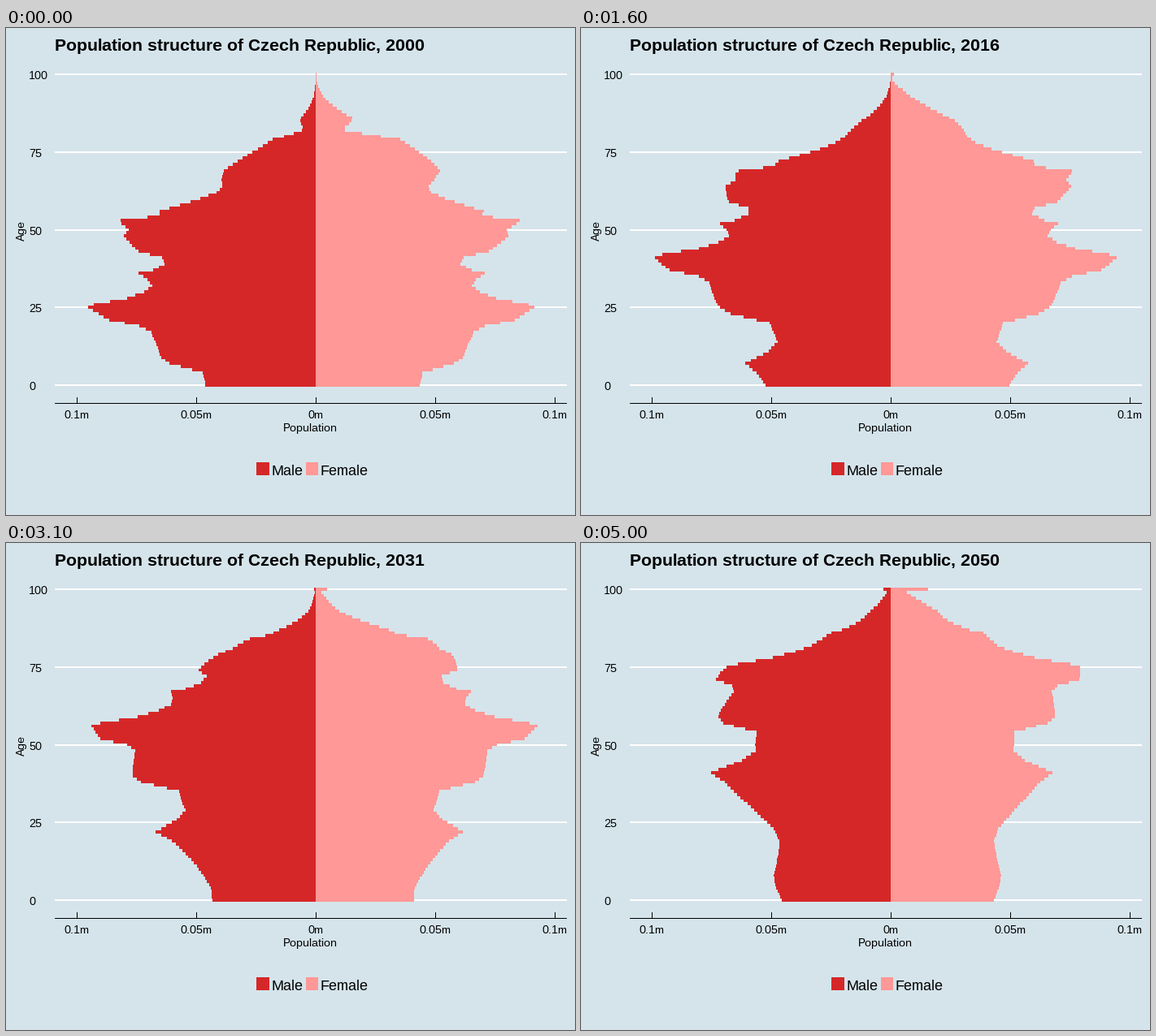
A matplotlib script for the animation above (5.1 s loop, 700x600 px).

```python
import numpy as np
import matplotlib.pyplot as plt
from matplotlib.animation import FuncAnimation
from matplotlib.patches import Polygon, Rectangle

plt.rcParams.update({"font.family": "Liberation Sans",
                     "text.hinting": "default", "text.hinting_factor": 1})

W, H, DPI = 700, 600, 100
BACK, MALE, FEMALE = "#d5e4eb", "#d62728", "#ff9896"
LEFT, RIGHT, MID = 60, 690, 381
BOTTOM, TOP = 442, 55
FIRST, LAST = 2000, 2050

# Turning points of the number of boys per birth year, in pixels of bar
# length (294 px stand for 0.1 million people).
BOYS = [
    (1900, 130), (1914, 130), (1917, 68), (1918, 62), (1921, 136),
    (1931, 150), (1936, 130), (1938, 132), (1940, 148), (1944, 190),
    (1945, 188), (1946, 200), (1947, 230), (1948, 227), (1950, 216),
    (1952, 219), (1957, 199), (1959, 171), (1961, 168), (1963, 181),
    (1964, 197), (1966, 187), (1968, 183), (1970, 193), (1972, 214),
    (1974, 254), (1975, 262), (1979, 241), (1981, 207), (1983, 195),
    (1991, 188), (1993, 178), (1996, 138), (2002, 134), (2005, 147),
    (2009, 177), (2012, 164), (2020, 143), (2027, 128), (2031, 127),
    (2042, 142), (2045, 141), (2050, 134)]
# Girls per boy.
GIRLS = [(1900, .5), (1920, 1.2), (1940, 1.05), (1960, .975),
         (1980, .975), (1995, .947)]


def curve(x, points):
    return np.interp(x, *zip(*points))


def settled(age, born):
    """Growth of a cohort as migrants arrive, mostly in their twenties."""
    gain = .14 + .14 * np.clip((born - 1975) / 25, 0, 1)
    return gain / (1 + np.exp((24 - age) / 5.5))


def survival(age, born, span, spread, progress):
    """Gompertz law; each later cohort lives a little longer."""
    mode = span + progress * (born - 1940)
    return np.exp(-np.exp((age - mode) / spread))


def gather(people):
    """One bar per age, with everyone from 100 up in the top one."""
    return np.append(people[:100], people[100:].sum())


AGES = np.arange(111)


def men(year):
    born = year - AGES
    alive = survival(AGES, born, 81, 12, .15)
    return gather(curve(born, BOYS) * alive * (1 + settled(AGES, born)))


def women(year):
    born = year - AGES
    births = curve(born, BOYS) * curve(born, GIRLS)
    alive = survival(AGES, born, 87.9, 10.5, .13)
    return gather(births * alive * (1 + .72 * settled(AGES, born)))


fig = plt.figure(figsize=(W / DPI, H / DPI), dpi=DPI, facecolor=BACK)
ax = fig.add_axes([0, 0, 1, 1])
ax.set(xlim=(0, W), ylim=(H, 0))
ax.axis("off")


def box(x, y, w, h, color):
    ax.add_patch(Rectangle((x, y), w, h, fc=color, lw=0, aa=False))


def label(x, y, text, px, **kw):
    kw.setdefault("va", "baseline")
    return ax.text(x, y, text, fontsize=px * 72 / DPI, color="black", **kw)


box(MID - .5, TOP, 1, BOTTOM - TOP, "#b0b4b6")
for age in range(0, 101, 25):
    y = round(439 - 3.83 * age)
    box(LEFT, y, RIGHT - LEFT, 2, "white")
    label(28, y + 7, str(age), 14)

box(LEFT, 462, RIGHT - LEFT, 1, "black")
for i in range(-2, 3):
    x = MID + 147 * i
    box(x, 455, 1, 7, "black")
    label(x, 481, f"{abs(i) * .05:g}m", 14, ha="center")

label(374.5, 497, "Population", 14, ha="center")
label(19.5, 249.5, "Age", 14, ha="center", va="center", rotation=90)

box(308, 535, 16, 16, MALE)
label(327, 551, "Male", 18)
box(369, 535, 15, 16, FEMALE)
label(387, 551, "Female", 18)

title = label(60, 28, "", 21, weight="bold")

steps = np.repeat(np.round(np.linspace(BOTTOM, TOP, 102)), 2)[1:-1]


def outline(people, sign, year):
    x = MID + sign * np.repeat(np.round(people(year)), 2)
    return np.vstack([[MID, BOTTOM], np.column_stack([x, steps]), [MID, TOP]])


sides = []
for people, sign, color in [(men, -1, MALE), (women, 1, FEMALE)]:
    shape = Polygon(outline(people, sign, FIRST), fc=color, lw=0, aa=False,
                    zorder=2)
    ax.add_patch(shape)
    sides.append((shape, people, sign))


def draw(frame):
    year = FIRST + frame
    title.set_text(f"Population structure of Czech Republic, {year}")
    for shape, people, sign in sides:
        shape.set_xy(outline(people, sign, year))
    return [title] + [side[0] for side in sides]


anim = FuncAnimation(fig, draw, frames=LAST - FIRST + 1, interval=100,
                     repeat=True)
plt.show()
```
